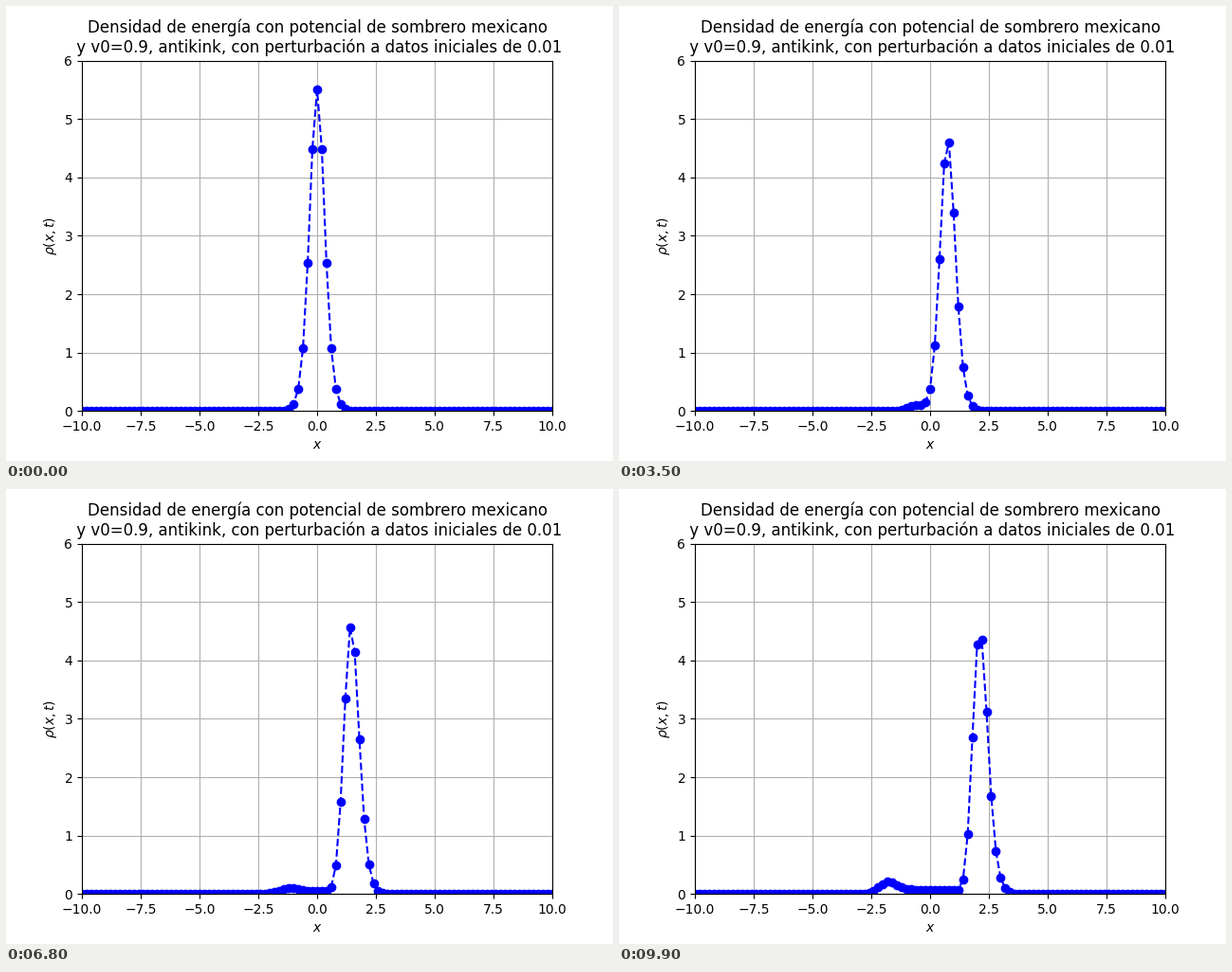
A matplotlib script for the animation above (10 s loop, 640 px wide and 480 px high).

```python
import numpy as np
import matplotlib.pyplot as plt
from matplotlib.animation import FuncAnimation

FRAMES, INTERVAL = 100, 100
x = np.linspace(-10, 10, 101)


def gauss(d, width):
    return np.exp(-d ** 2 / (2 * width ** 2))


def step(d, width):
    return (1 + np.tanh(d / (2 * width))) / 2


def lump(t, center):
    """Moving sech^4 pulse whose trailing side steepens with time."""
    d = x - center
    height = 4.7 - .0017 * t ** 2 + .805 * gauss(t, 1.16)
    behind = np.clip(-d, 0, 1.5)
    skew = .07 * max(t - 1, 0) * (.3 + behind ** 2) * (d < 0)
    steepness = 1.61 - .013 * t + skew
    return height / np.cosh(steepness * d) ** 4


def radiation(t, center):
    """Bump moving left, with a low wake between it and the pulse."""
    back = .04 - .19 * t
    bump = (.0017 * t ** 2 + .12 * gauss(t - 2.6, .8)) * gauss(x - back, .38)
    wake = .0075 * t * step(x - back, .15) * step(center - .8 - x, .15)
    return bump + wake


def density(t):
    center = .2125 * t - .07 * t * np.exp(-1.15 * t)
    return lump(t, center) + radiation(t, center)


fig, ax = plt.subplots(figsize=(6.4, 4.8), dpi=100)
line, = ax.plot(x, density(0), "o--", color="b")
ax.set_xlim(-10, 10)
ax.set_ylim(0, 6)
ax.set_xlabel("$x$")
ax.set_ylabel(r"$\rho(x,t)$")
ax.set_title("Densidad de energía con potencial de sombrero mexicano\n"
             " y v0=0.9, antikink, con perturbación a datos iniciales de 0.01")
ax.grid(True)


def update(i):
    line.set_ydata(density(i * INTERVAL / 1000))
    return line,


anim = FuncAnimation(fig, update, frames=FRAMES, interval=INTERVAL,
                     repeat=True, repeat_delay=0)
plt.show()
```
